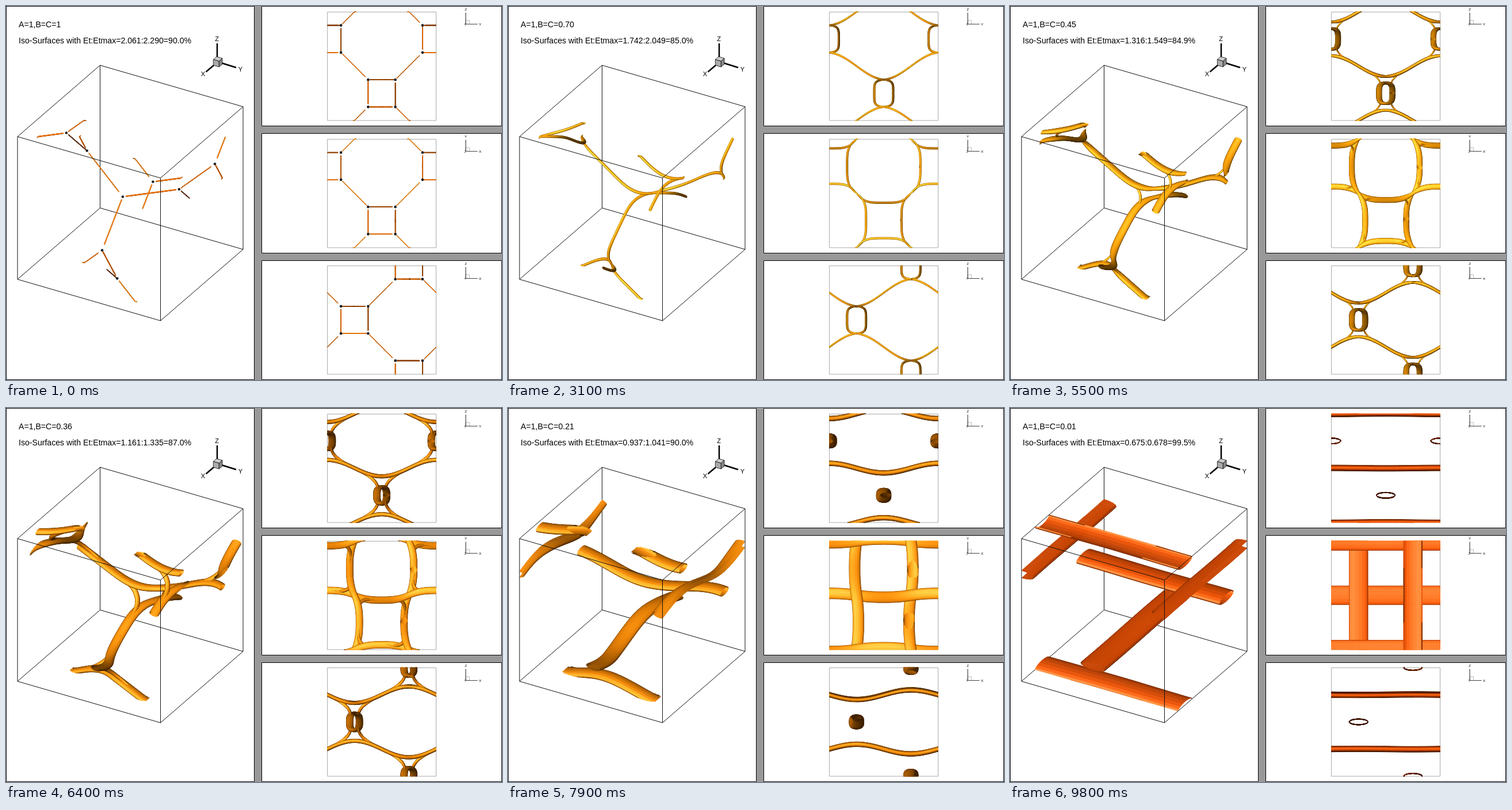
An HTML page with a canvas for the animation above (9.9 s loop, 862 by 650 pixels).

```html
<!DOCTYPE html>
<html>
<head>
<meta charset="utf-8">
<style>
html, body { margin: 0; width: 100%; height: 100%; overflow: hidden; background: #999; }
canvas { display: block; }
</style>
</head>
<body>
<canvas id="stage" width="862" height="650"></canvas>
<script>
const g = document.getElementById('stage').getContext('2d');
const { sin, asin, cos, abs, min, max, exp, hypot, PI } = Math;
const clamp = v => max(0, min(1, v));
const mix = (a, b, t) => a + (b - a) * t;
const dot = (a, b) => a[0] * b[0] + a[1] * b[1] + a[2] * b[2];
const cross = (a, b) => [a[1] * b[2] - a[2] * b[1], a[2] * b[0] - a[0] * b[2], a[0] * b[1] - a[1] * b[0]];
const sub = (a, b) => a.map((v, i) => v - b[i]);
const unit = a => { const l = hypot(...a) || 1; return a.map(v => v / l); };

// B, maximum, level ratio, tube half width, tube half height, green
const KEYS = [
  [1, 2.290, .9, .0022, .0022, 118],
  [.85, 2.207, .9, .0032, .0032, 118],
  [.7, 2.049, .85, .008, .008, 165],
  [.56, 1.810, .8243, .016, .011, 182],
  [.36, 1.335, .87, .031, .017, 145],
  [.21, 1.041, .9, .05, .022, 142],
  [.01, .678, .995, .086, .026, 90]
];
function keyed(B) {
  let i = 1;
  while (i < KEYS.length - 1 && B < KEYS[i][0]) i++;
  const a = KEYS[i - 1], b = KEYS[i], t = (B - a[0]) / (b[0] - a[0]);
  return a.map((v, j) => mix(v, b[j], t));
}

function makeView(ox, oy, X, Y, Z) {
  const r1 = [X[0], Y[0], Z[0]], r2 = [X[1], Y[1], Z[1]];
  const eye = unit(cross(r2, r1)), right = unit(r1), down = unit(r2);
  return {
    eye,
    light: unit(eye.map((v, i) => v - .3 * right[i] - .15 * down[i])),
    at: p => [ox + dot(r1, p), oy + dot(r2, p)]
  };
}
const S = 189;
const MAIN = makeView(163.5, 351, [-143.5, 124], [248.5, 72], [0, -248]);
const SIDES = [
  { top: 0, box: 10, up: 'Z', across: 'Y', out: 'X', view: makeView(558.5, 199, [0, 0], [S, 0], [0, -S]) },
  { top: 221, box: 231, up: 'Y', across: 'X', out: 'Z', view: makeView(558.5, 420, [S, 0], [0, -S], [0, 0]) },
  { top: 442, box: 451, up: 'Z', across: 'X', out: 'Y', view: makeView(558.5, 640, [S, 0], [0, 0], [0, -S]) }
];

// Offsets (sideways, vertical) of a tube axis; phase 0 is a crossing of two tubes
function makeCurve(B) {
  const edge = .25 - asin(min(1, Math.SQRT1_2 / B)) / (2 * PI);
  const bow = .087 * (B < .707 ? sin(PI / 2 * B / .707) ** 2 : ((1 - B) / .293) ** 2);
  const power = 2 + 2 * min(1, (B / .6) ** 2);
  const rise = min(.125, .21 * B), straight = clamp((B - .65) / .25);
  const curve = phase => {
    let q = ((phase % 1) + 1) % 1, s = 1;
    if (q >= .5) { q -= .5; s = -1; }
    const near = min(q, .5 - q);
    const t = max(-1, min(1, (.25 - q) / (.25 - edge)));
    const side = near <= edge ? near : edge + bow * (1 - abs(t) ** power);
    return { side: s * side, lift: s * rise * mix(sin(PI * t / 2), t, straight), near };
  };
  return { curve, edge };
}

function buildScene(B) {
  const [, , , w, h, green] = keyed(B);
  const { curve, edge } = makeCurve(B);
  const faces = [], dots = [];
  const around = B > .66 ? 6 : 16;
  const pinch = .75 * exp(-(((B - .56) / .12) ** 2));
  const gap = B > .71 ? .016 : 0;

  function sweep(axis, side, w, h, steps) {
    let last = null;
    for (let i = 0; i <= steps; i++) {
      const { p, r, skip } = axis(i / steps), ring = [];
      for (let j = 0; j < around; j++) {
        const a = 2 * PI * j / around, u = w * r * cos(a), v = h * r * sin(a);
        ring.push([p[0] + side[0] * u, p[1] + side[1] * u, p[2] + v]);
      }
      if (last && !skip) for (let j = 0; j < around; j++) {
        const k = (j + 1) % around;
        addFace([last[j], last[k], ring[k], ring[j]]);
      }
      last = ring;
    }
  }
  function addFace(pts) {
    for (let c = 0; c < 3; c++)
      if (pts.every(p => p[c] <= 0) || pts.every(p => p[c] >= 1)) return;
    const n = unit(cross(sub(pts[2], pts[0]), sub(pts[3], pts[1])));
    faces.push({ n, pts: pts.map(p => p.map(clamp)) });
  }
  const style = c => ({
    r: 1 - pinch * exp(-((c.near / .05) ** 2)),
    skip: abs(c.near - edge) < gap
  });
  const xTube = (y0, z0, s) => ({ s, y0, axis: x => {
    const c = curve(x - .25);
    return { p: [x, y0 + s * c.side, z0 - s * c.lift], ...style(c) };
  } });
  const yTube = (x0, z0, s) => ({ s, x0, axis: y => {
    const c = curve(y - .5);
    return { p: [x0 + s * c.side, y, z0 + s * c.lift], ...style(c) };
  } });
  const xs = [xTube(.5, .25, -1), xTube(0, .75, 1), xTube(1, .75, 1)];
  const ys = [yTube(.25, .5, -1), yTube(.75, 0, 1), yTube(.75, 1, 1)];
  xs.forEach(t => sweep(t.axis, [0, 1], w, h, 72));
  ys.forEach(t => sweep(t.axis, [1, 0], w, h, 72));

  // Thin strands that still join the tubes after they part
  const strand = .015 * exp(-(((B - .38) / .07) ** 2));
  if (strand > .003) for (const a of xs) for (const b of ys) {
    const pa = a.axis(b.x0).p, pb = b.axis(a.y0).p;
    if (abs(pa[2] - pb[2]) > .3) continue;
    const mid = [b.x0, a.y0, (pa[2] + pb[2]) / 2];
    for (const d of [-1, 1]) {
      const from = b.axis(a.y0 - a.s * b.s * d * .2).p, to = a.axis(b.x0 + d * .2).p;
      const side = unit([from[1] - to[1], to[0] - from[0], 0]);
      sweep(t => ({
        p: mid.map((m, i) => (1 - t) ** 2 * from[i] + 2 * t * (1 - t) * m + t * t * to[i]), r: 1
      }), side, strand, strand, 20);
    }
  }
  if (B >= .707) for (const t of xs.slice(0, 2))
    for (const f of [-edge, edge, .5 - edge, .5 + edge]) {
      const p = t.axis(.25 + f).p;
      dots.push([p[0], (p[1] + 1) % 1, p[2]]);
    }
  return { faces, dots, green };
}

function line(pts, color, width, close, fill) {
  g.beginPath();
  pts.forEach(p => g.lineTo(p[0], p[1]));
  if (close) g.closePath();
  if (fill) { g.fillStyle = fill; g.fill(); }
  g.strokeStyle = color;
  g.lineWidth = width;
  g.stroke();
}
function label(text, x, y, size, align = 'center') {
  g.font = size + 'px "Liberation Sans", Arial, sans-serif';
  g.textAlign = align;
  g.fillStyle = '#000';
  g.fillText(text, x, y);
}
function panel(x, y, w, h) {
  g.fillStyle = '#fff';
  g.fillRect(x, y, w, h);
  g.strokeStyle = '#000';
  g.lineWidth = 1;
  g.strokeRect(x + .5, y + .5, w - 1, h - 1);
}

function drawScene({ faces, dots, green }, { at, eye, light }) {
  const sorted = faces.map(f => ({ f, depth: f.pts.reduce((s, p) => s + dot(p, eye), 0) }));
  sorted.sort((a, b) => a.depth - b.depth);
  g.lineJoin = 'round';
  for (const { f } of sorted) {
    const b = max(0, dot(f.n, light) * (dot(f.n, eye) < 0 ? -1 : 1));
    const k = .25 + .9 * b, shine = b ** 10;
    const color = `rgb(${min(255, 255 * k) | 0},${min(255, green * k + 50 * shine) | 0},${8 * k + 65 * shine | 0})`;
    line(f.pts.map(at), color, .6, true, color);
  }
  g.fillStyle = '#1c1c1c';
  for (const d of dots) {
    const [x, y] = at(d);
    g.beginPath();
    g.arc(x, y, 2.3, 0, 2 * PI);
    g.fill();
  }
}

function cubeEdges(back) {
  for (let axis = 0; axis < 3; axis++)
    for (let i = 0; i < 4; i++) {
      if ((i === 0) !== back) continue;
      const a = [0, 0, 0];
      a[(axis + 1) % 3] = i & 1;
      a[(axis + 2) % 3] = i >> 1;
      const b = a.slice();
      b[axis] = 1;
      line([MAIN.at(a), MAIN.at(b)], '#111', 1);
    }
}

function mainTriad() {
  line([[367, 97], [367, 65]], '#000', 2.5);
  line([[368, 97], [347.5, 114.5]], '#000', 2.5);
  line([[368, 97], [400, 107]], '#000', 2.5);
  const tiny = makeView(366, 98, [-5.7, 5], [10, 2.9], [0, -10]).at;
  const face = (pts, fill) => line(pts.map(tiny), '#111', .8, true, fill);
  face([[0, 0, 1], [1, 0, 1], [1, 1, 1], [0, 1, 1]], '#ccc');
  face([[1, 0, 0], [1, 1, 0], [1, 1, 1], [1, 0, 1]], '#aaa');
  face([[0, 1, 0], [1, 1, 0], [1, 1, 1], [0, 1, 1]], '#888');
  label('Z', 366.5, 61, 11);
  label('X', 342.5, 122, 11);
  label('Y', 407.5, 114, 11);
}

function sideTriad({ top, up, across, out }) {
  const y = top + 31.5;
  line([[799, y], [799, y - 6.5], [805.5, y - 6.5], [805.5, y]], '#aaa', .8);
  line([[799, y - 20], [799, y], [819.5, y]], '#444', 1.2);
  label(up, 799, top + 8, 6);
  label(across, 824, y + 2, 6);
  label(out, 798, y + 2, 4.5);
}

function draw(B) {
  const scene = buildScene(B);
  const [, peak, ratio] = keyed(B);
  g.fillStyle = '#999';
  g.fillRect(0, 0, 862, 650);

  panel(0, 0, 432, 650);
  cubeEdges(true);
  drawScene(scene, MAIN);
  cubeEdges(false);
  mainTriad();
  const shown = B === 1 ? '1' : B === .707 ? '0.707' : B.toFixed(2);
  label(`A=1,B=C=${shown}`, 22, 37, 14.1, 'left');
  label(`Iso-Surfaces with Et:Etmax=${(peak * ratio).toFixed(3)}:${peak.toFixed(3)}=${(100 * ratio).toFixed(1)}%`,
    22, 65, 14.1, 'left');

  for (const s of SIDES) {
    panel(444, s.top, 418, s.top === 442 ? 208 : 209);
    g.strokeStyle = '#aaa';
    g.lineWidth = 1;
    g.strokeRect(558.5, s.box + .5, S, S - .5);
    drawScene(scene, s.view);
    sideTriad(s);
  }
}

function valueAt(step) {
  if (step === 30) return .707;
  return (100 - step + (step > 30) - (step >= 55) - (step >= 90)) / 100;
}

let shownStep = -1;
const start = performance.now();
function tick() {
  const step = Math.floor((performance.now() - start) % 9900 / 100);
  if (step !== shownStep) draw(valueAt(shownStep = step));
  requestAnimationFrame(tick);
}
tick();
</script>
</body>
</html>
```
